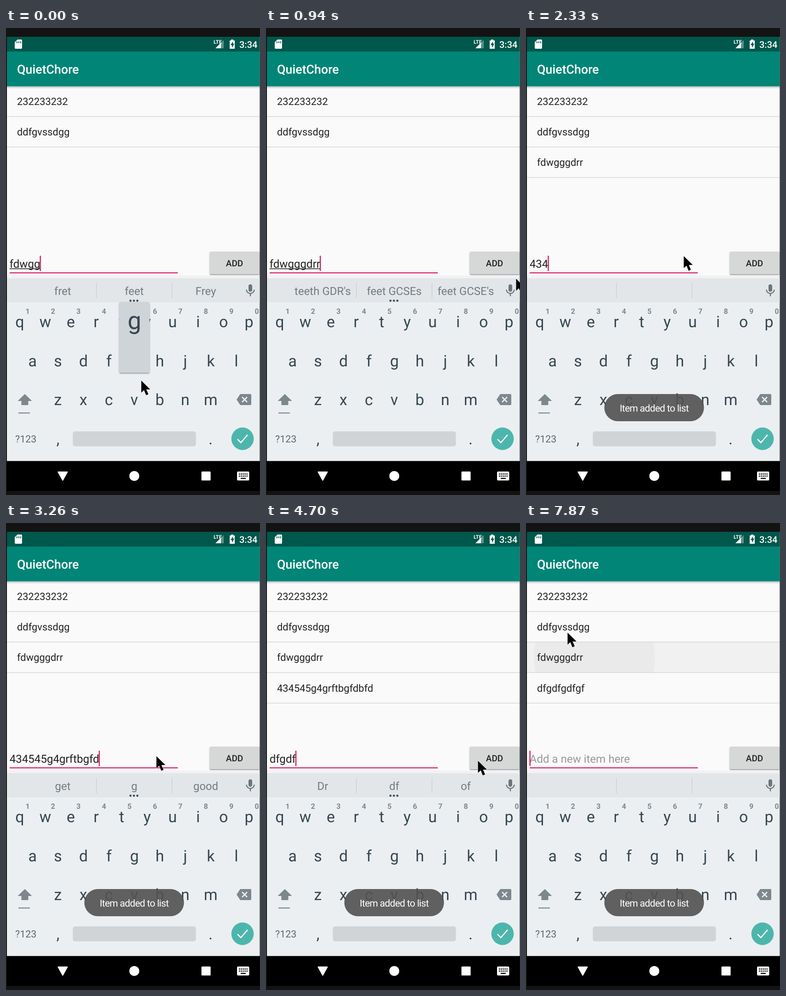
Animation, 553 px wide and 1013 px high, one loop 7.99 s. Source, as an HTML page:

```html
<!DOCTYPE html>
<html lang="en">
<head>
<meta charset="utf-8">
<title>Todo list</title>
<style>
  html, body { margin: 0; width: 100%; height: 100%; overflow: hidden; background: #131313; }
  svg { display: block; width: 553px; height: 1013px; font-family: Roboto, sans-serif; text-rendering: geometricPrecision; }
  .mid { text-anchor: middle; }
  .medium { font-weight: 500; }
  .item { font-size: 21.9px; fill: #222; }
  .edit { font-size: 24.1px; }
  .key { font-size: 34px; fill: #37474f; }
  .digit { font-size: 16px; font-weight: 700; fill: #7e888d; }
  .word { font-size: 24px; fill: #737b80; }
  .toast { font-size: 21px; letter-spacing: -.68px; fill: #fff; }
</style>
</head>
<body>
<svg viewBox="0 0 553 1013">
  <defs>
    <linearGradient id="fade" x2="0" y2="1">
      <stop stop-opacity=".26"/><stop offset="1" stop-opacity="0"/>
    </linearGradient>
    <filter id="lift" x="-10%" y="-10%" width="120%" height="125%">
      <feDropShadow dx="0" dy="1.5" stdDeviation="1.2" flood-opacity=".45"/>
    </filter>
    <clipPath id="row"><path d="M2 259H552V324H2z"/></clipPath>
  </defs>

  <rect width="553" height="1013" fill="#131313"/>
  <rect x="2" y="19" width="550.4" height="525" fill="#fafafa"/>
  <rect x="2" y="126" width="550.4" height="6" fill="url(#fade)"/>
  <rect x="2" y="51" width="550.4" height="75.4" fill="#008577"/>
  <rect x="2" y="19" width="550.4" height="32" fill="#00574b"/>
  <text x="24" y="99" class="medium" font-size="26.8" fill="#fff">QuietChore</text>

  <g fill="#fff">
    <path d="M25 25H33Q35 25 35 27V43Q35 45 33 45H21Q19 45 19 43V31z"/>
    <path d="M24 29v4M28 29v4M32 29v4" stroke="#00574b" stroke-width="1.8"/>
    <text x="452" y="34" font-size="11" font-weight="700">LTE</text>
    <path d="M474 26V44H456z" opacity=".35"/>
    <path d="M468 32V44H456z"/>
    <path d="M490 27V25H495V27H498V45H487V27z"/>
    <path d="M494 29L489 37H492V43L497 34H494z" fill="#00574b"/>
    <text x="508" y="42.700" class="medium" font-size="20">3:34</text>
  </g>

  <g id="press" clip-path="url(#row)">
    <rect x="2" y="259" width="550" height="65" fill="#f1f1f1"/>
    <circle id="ripple" cy="291" fill="#eaeaea"/>
  </g>
  <g id="items"></g>

  <rect x="8" y="530" width="366" height="2.2" fill="#d81b60"/>
  <text id="entry" x="7.7" y="520" class="edit"></text>
  <rect id="under" y="521.5" height="1.6" fill="#222"/>
  <rect id="caret" y="494" width="2.4" height="33" fill="#d81b60"/>
  <rect id="button" x="443.5" y="485" width="108.5" height="49" rx="2.5" filter="url(#lift)"/>
  <text x="497.5" y="517" class="mid medium" font-size="19" fill="#222">ADD</text>

  <rect x="2" y="537" width="550" height="6" fill="#f1f2f2"/>
  <rect x="2" y="543" width="550.4" height="397" fill="#ebeff2"/>
  <rect x="2" y="543" width="550.4" height="52" fill="#e2e6e9"/>
  <path d="M196.700 553V586M361.400 553V586" stroke="#c8cdd0" stroke-width="1.3"/>
  <g id="words"></g>
  <g id="dots" fill="#37474f">
    <circle cx="271" cy="591.5" r="2.3"/><circle cx="278.5" cy="591.5" r="2.3"/><circle cx="286" cy="591.5" r="2.3"/>
  </g>
  <g fill="none" stroke="#6b767b" stroke-width="2.4">
    <rect x="528" y="556" width="8" height="16" rx="4" fill="#6b767b" stroke="none"/>
    <path d="M523.5 567.5a8.5 8.5 0 0 0 17 0M532 576v6"/>
  </g>

  <g id="keys"></g>
  <g fill="#7d888c">
    <path d="M41 794L56.5 809H48.5V818H33.5V809H25.5z"/>
    <rect x="27" y="834" width="25" height="2.2"/>
    <path d="M510 794H532Q534 794 534 796V816Q534 818 532 818H510L502 806z"/>
    <path d="M514 800.5l11 11m0-11l-11 11" stroke="#ebeff2" stroke-width="2.6"/>
  </g>
  <text x="20" y="899" font-size="21.5" fill="#5d696f">?123</text>
  <rect x="145.5" y="875" width="268" height="32.5" rx="5" fill="#d0d4d7"/>
  <circle cx="515" cy="891" r="24.4" fill="#4db6ac"/>
  <path d="M504 892l7.3 7.3L526 882.5" fill="none" stroke="#fff" stroke-width="2.5"/>

  <g id="popup">
    <rect x="-33" width="66" height="153.5" rx="3" fill="#ced4d7" filter="url(#lift)"/>
    <text id="big" y="58.5" class="mid" font-size="53" fill="#37474f"></text>
  </g>

  <g id="toast">
    <rect x="170.5" y="794" width="217" height="59" rx="29.5" fill="#515151" fill-opacity=".9"/>
    <text x="279" y="831.5" class="mid toast">Item added to list</text>
  </g>

  <rect x="2" y="939.3" width="550.4" height="64.7"/>
  <g fill="#fff">
    <path d="M113.5 963H133.5L123.5 981z" stroke="#fff" stroke-width="2" stroke-linejoin="round"/>
    <circle cx="279.3" cy="971.7" r="10.8"/>
    <rect x="425.5" y="962" width="20" height="19.5" rx="1.5"/>
    <rect x="503" y="962" width="26.5" height="19.5" rx="2.5"/>
    <path d="M507 967.5H526M507 972H526" stroke="#000" stroke-width="2.5" stroke-dasharray="2.5 1.6"/>
    <path d="M511 977H522" stroke="#000" stroke-width="2.4"/>
  </g>

  <path id="mouse" d="M.5 .8V27L6.500 21.500L11 32.500L16 30.500L11.500 20H20z" stroke="#fff" stroke-width="1.4" stroke-opacity=".7" paint-order="stroke"/>
</svg>
<script>
// All times below are counted in screen refreshes
const LOOP = 7990, REFRESH = 131;
const REMOVED = 50, HELD = 58;
const $ = id => document.getElementById(id);

// from/to: typing span, add: moved to the list, mark/word: when and where the underline starts
const drafts = [
  { text: "fdwgggdrr", from: -8, to: 6, ease: 1, add: 12, mark: 0, word: 0, hinted: 0,
    hints: ["fret|feet|Frey", "feet GD|feet G|feet GDR", "teeth GDR's|feet GCSEs|feet GCSE's"] },
  { text: "434545g4grftbgfdbfd", from: 14, to: 26, ease: 1.5, add: 31, mark: 27, word: 8, hinted: 23,
    hints: ["get|g|good", "graft beds|grftbgfd|graft before"] },
  { text: "dfgdfgdfgf", from: 33, to: 39, ease: 1, add: 41, mark: 39, word: 0, hinted: 35,
    hints: ["Dr|df|of", "dig dug|dfgdfg|dog dig"] }
];

// Mouse stops: time, x, y
const stops = [[0, 294, 764], [5, 200, 677], [7, 544, 543], [12, 488, 508], [13, 406, 490],
  [18, 343, 494], [22, 327, 505], [25, 327, 505], [29, 486, 524], [36, 461, 515],
  [41, 478, 502], [46, 95, 347], [51, 95, 349], [53, 95, 286], [59, 95, 278], [60, 90, 237]];

const clamp = v => Math.min(1, Math.max(0, v));

function mouseAt(k) {
  const i = stops.findLastIndex(s => s[0] <= k);
  const [t0, x0, y0] = stops[i], [t1, x1, y1] = stops[i + 1] || [k + 1, x0, y0];
  const p = (k - t0) / (t1 - t0);
  return [x0 + (x1 - x0) * p, y0 + (y1 - y0) * p];
}

const typedCount = (d, k) => Math.floor(d.text.length * clamp((k - d.from) / (d.to - d.from)) ** d.ease);
const toastFade = (k, start, end) => clamp(Math.min((k - start + .9) / 2.2, (end - k) / 3.5));

const label = (x, y, cls, s) => `<text x="${x}" y="${y}" class="${cls}">${s}</text>`;

function set(id, attrs) {
  for (const name in attrs) $(id).setAttribute(name, attrs[name]);
}
const show = (id, on) => set(id, { visibility: on ? "visible" : "hidden" });

const spots = {};
let keys = label(113, 903, "key mid", ",") + label(445.5, 903, "key mid", ".");
[["qwertyuiop", 30], ["asdfghjkl", 57.7], ["zxcvbnm", 113]].forEach(([letters, x0], row) => {
  [...letters].forEach((c, i) => {
    const x = x0 + i * 55.45, y = 649.3 + row * 84.4;
    spots[c] = [x, y];
    keys += label(x, y, "key mid", c);
    if (row === 0) keys += label(x + 17, 619.5, "digit mid", (i + 1) % 10);
  });
});
$("keys").innerHTML = keys;

function drawList(k) {
  const added = drafts.filter(d => k >= d.add && !(d === drafts[1] && k >= REMOVED));
  const items = ["232233232", "ddfgvssdgg", ...added.map(d => d.text)];
  $("items").innerHTML = items.map((s, i) =>
    label(24, 167 + i * 66.2, "item", s) +
    `<rect x="2" y="${191.3 + i * 66.2}" width="550" height="1.4" fill="#d4d4d4"/>`).join("");

  const p = clamp((k - HELD + 1) / 3);
  show("press", k >= HELD);
  set("ripple", { cx: 95 + 54 * p, r: 132 * p });
}

function drawEntry(k, draft) {
  const text = draft ? draft.text.slice(0, typedCount(draft, k)) : "";
  const entry = $("entry");
  entry.textContent = text || "Add a new item here";
  set("entry", { fill: text ? "#222" : "#999" });

  const edge = n => 7.7 + (n ? entry.getSubStringLength(0, n) : 0);
  const end = edge(text.length);
  set("caret", { x: text ? end - 1 : 7.5 });
  show("caret", k < 47 || (k - 47) % 8 >= 4);

  const marked = text && k >= draft.mark;
  if (marked) {
    const left = edge(draft.word);
    set("under", { x: left, width: end - left });
  }
  show("under", marked);
}

function drawKeyboard(k, draft) {
  let words = "";
  if (draft && k >= draft.hinted) {
    const step = Math.floor((k - draft.hinted) / 3);
    words = draft.hints[Math.min(step, draft.hints.length - 1)];
  }
  $("words").innerHTML = words.split("|").map((s, i) => label(123.5 + i * 155.7, 579, "word mid", s)).join("");
  show("dots", words);

  // Only the first entry is clicked on the screen keys
  const n = typedCount(drafts[0], k), tapped = n > typedCount(drafts[0], k - 1);
  show("popup", tapped);
  if (tapped) {
    const c = drafts[0].text[n - 1], [x, y] = spots[c];
    $("big").textContent = c;
    set("popup", { transform: `translate(${x} ${y - 139.5})` });
  }
}

function draw(k) {
  const draft = drafts.find(d => k >= d.from && k < d.add);
  drawList(k);
  drawEntry(k, draft);
  drawKeyboard(k, draft);
  const pressed = drafts.some(d => Math.abs(k - d.add) <= 1);
  set("button", { fill: pressed ? "#cccdcd" : "#d6d7d7" });
  set("toast", { opacity: Math.max(toastFade(k, 12, 29), toastFade(k, 32, 99)) });
  set("mouse", { transform: `translate(${mouseAt(k)})` });
}

let last = -1;
function loop() {
  const k = Math.floor(performance.now() % LOOP / REFRESH + .45);
  if (k !== last) draw(last = k);
  requestAnimationFrame(loop);
}
loop();
</script>
</body>
</html>
```
